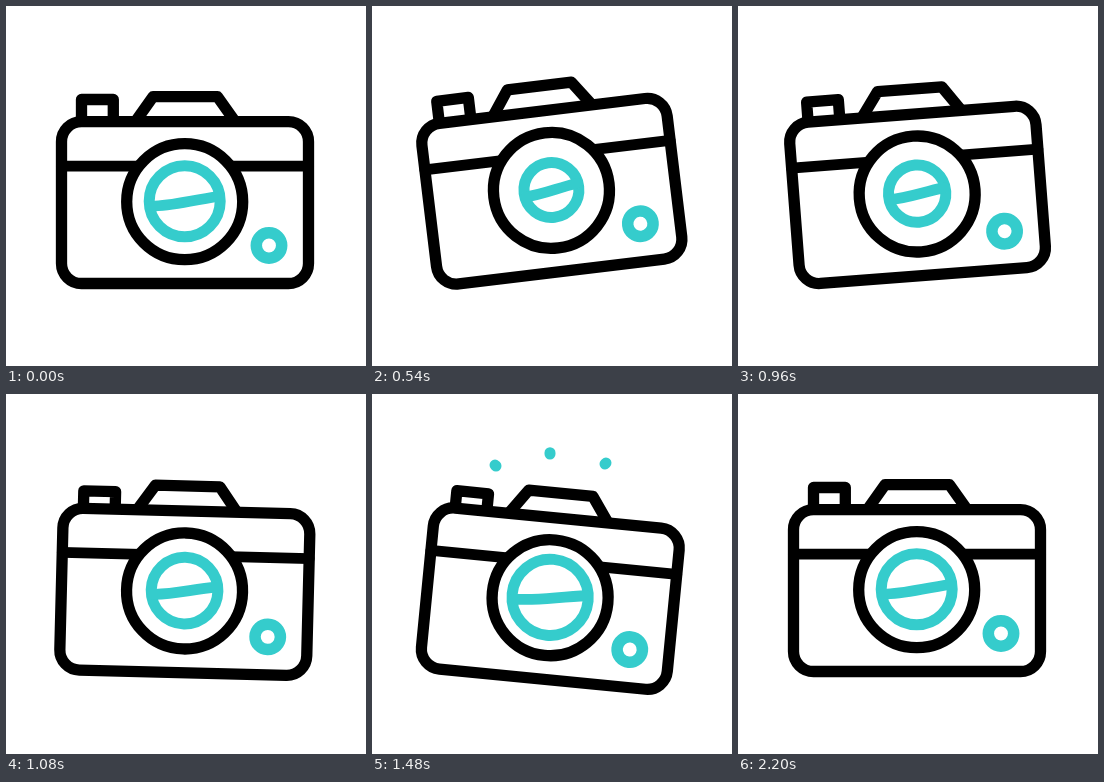
Animation of 360x360 px, one loop 2220 ms. Source, as an HTML page with a canvas:

```html
<!DOCTYPE html>
<html lang="en">
<head>
<meta charset="utf-8">
<title>Camera flash</title>
<style>
  html, body { margin: 0; width: 100%; height: 100%; overflow: hidden; background: #fff; }
  canvas { display: block; width: 360px; height: 360px; }
</style>
</head>
<body>
<canvas id="stage"></canvas>
<script>
const SIZE = 360, LOOP = 2220;
const BLACK = '#000', TEAL = '#35cccc';
const LINE = 11.3;
const PIVOT = { x: 179, y: 189.5 };
const KEY_TIMES = [20, 780, 1345, 1640];
const RAYS = [
  [124, 72, 97, 45],
  [178, 60, 178, 22],
  [233, 70, 260.5, 41.5]
];

const canvas = document.getElementById('stage');
const ctx = canvas.getContext('2d');
const ratio = window.devicePixelRatio || 1;
canvas.width = canvas.height = SIZE * ratio;

function ease(time, start, end) {
  const u = Math.min(1, Math.max(0, (time - start) / (end - start)));
  return u * u * (3 - 2 * u);
}

// Eases through one value per key time.
function keyed(time, values) {
  return values.slice(1).reduce((sum, value, i) =>
    sum + (value - values[i]) * ease(time, KEY_TIMES[i], KEY_TIMES[i + 1]), values[0]);
}

function stroke(color, width, trace) {
  ctx.beginPath();
  trace();
  ctx.strokeStyle = color;
  ctx.lineWidth = width;
  ctx.stroke();
}

function polyline(color, width, points) {
  stroke(color, width, () => points.forEach(([x, y]) => ctx.lineTo(x, y)));
}

function ring(color, x, y, radius, width) {
  stroke(color, width, () => ctx.arc(x, y, radius, 0, Math.PI * 2));
}

function drawCamera(time) {
  const angle = keyed(time, [0, -9, 10, 0]);
  const lift = keyed(time, [0, -14.8, 14.5, 0]);
  const radius = keyed(time, [35.5, 25, 40.2, 35.5]);
  const press = keyed(time, [0, 0, 8.5, 0]);

  ctx.save();
  ctx.translate(PIVOT.x, PIVOT.y + lift);
  ctx.rotate(angle * Math.PI / 180);
  ctx.translate(-PIVOT.x, -PIVOT.y);

  const buttonTop = 93.5 + press;
  polyline(BLACK, LINE, [[75.5, 114], [75.5, buttonTop], [107.3, buttonTop], [107.3, 114]]);
  polyline(BLACK, LINE, [[130.5, 114], [147, 90.7], [211.5, 90.7], [228, 114]]);
  stroke(BLACK, LINE, () => ctx.roundRect(55.5, 115.7, 247, 161.8, 20));
  polyline(BLACK, 10.8, [[55.5, 160.2], [302.5, 160.2]]);

  ctx.beginPath();
  ctx.arc(178.7, 195.7, 58, 0, Math.PI * 2);
  ctx.fillStyle = '#fff';
  ctx.fill();
  ring(BLACK, 178.7, 195.7, 58, LINE);

  ring(TEAL, 178.7, 195.3, radius, 11);
  const k = radius / 35.5;
  const px = x => 178.7 + x * k, py = y => 195.3 + y * k;
  stroke(TEAL, 10.8, () => {
    ctx.moveTo(px(-34), py(4.8));
    ctx.bezierCurveTo(px(-14), py(5), px(5), py(-0.8), px(34), py(-4.8));
  });

  ring(TEAL, 263, 239.5, 12.7, 11.5);
  ctx.restore();
}

function drawRays(time) {
  const head = ease(time, 1412, 2017), tail = ease(time, 1595, 2200);
  if (head <= tail) return;
  for (const [x0, y0, x1, y1] of RAYS) {
    const at = u => [x0 + (x1 - x0) * u, y0 + (y1 - y0) * u];
    polyline(TEAL, 11, [at(tail), at(head)]);
  }
}

function frame(now) {
  const time = now % LOOP;
  ctx.setTransform(ratio, 0, 0, ratio, 0, 0);
  ctx.fillStyle = '#fff';
  ctx.fillRect(0, 0, SIZE, SIZE);
  ctx.lineCap = ctx.lineJoin = 'round';
  drawCamera(time);
  drawRays(time);
  requestAnimationFrame(() => frame(performance.now() - startTime));
}

const startTime = performance.now();
frame(0);
</script>
</body>
</html>
```
